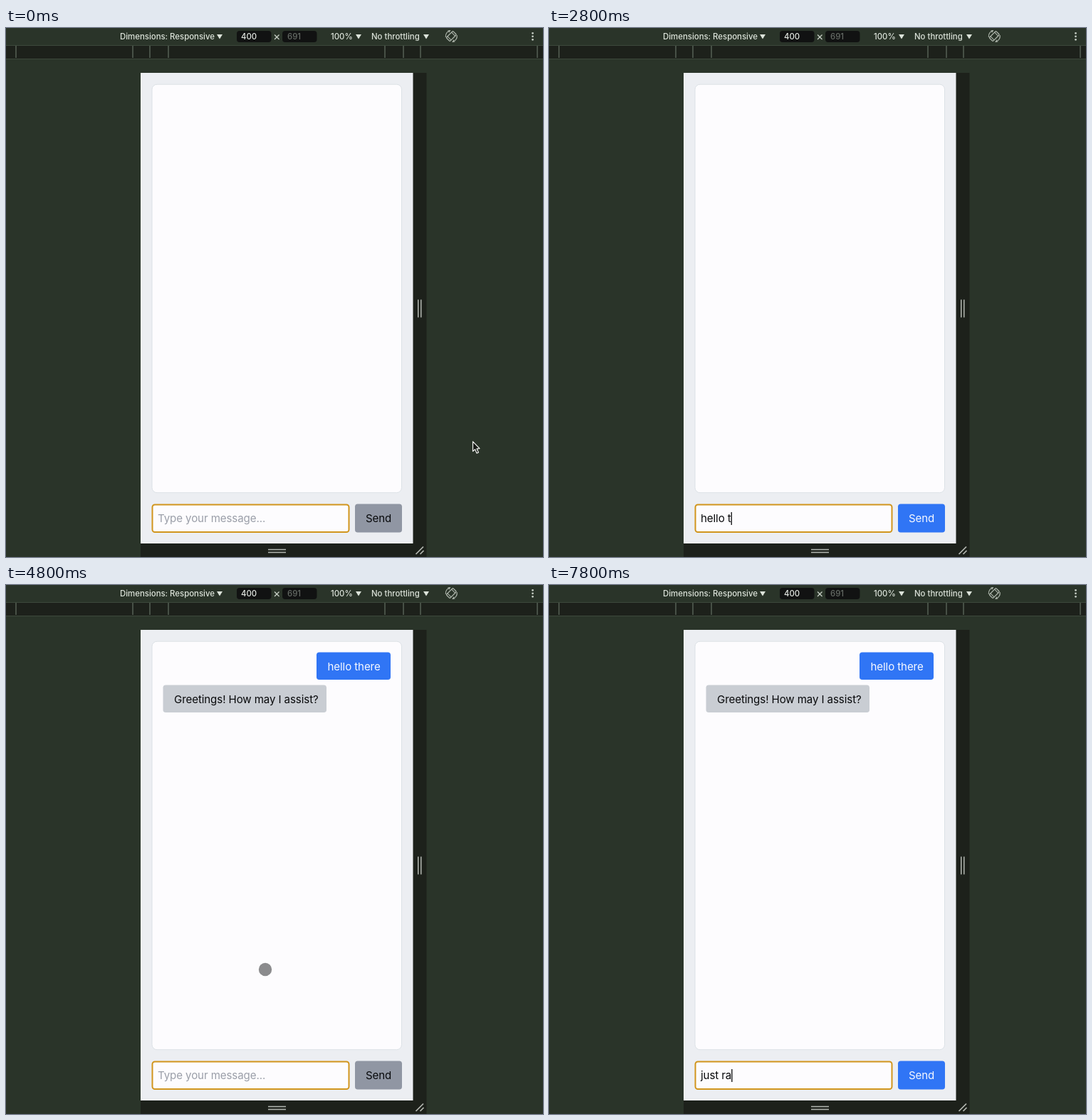
These frames come from a looping animation (754x743 px, 8000 ms). An HTML page with a canvas:

```html
<!DOCTYPE html>
<html lang="en">
<head>
<meta charset="utf-8">
<title>Chat preview</title>
<style>
html, body { margin: 0; width: 100%; height: 100%; overflow: hidden; background: #2a3429; }
canvas { display: block; }
</style>
</head>
<body>
<canvas id="stage" width="754" height="743"></canvas>
<script>
const ctx = document.getElementById('stage').getContext('2d');
const LOOP = 8000;
const SENT = 3800, REPLIED = 4000;
const PHONE_RIGHT = 571;
const CHAT = '15.1px Inter, sans-serif';
const BAR = '500 11.4px Inter, sans-serif';

// [time, text in the input]
const typing = [
  [0, ''], [800, 'h'], [1000, 'he'], [1200, 'hel'], [1500, 'hell'],
  [1800, 'hello'], [2300, 'hello '], [2700, 'hello t'], [2900, 'hello th'],
  [3000, 'hello the'], [3050, 'hello ther'], [3100, 'hello there'],
  [SENT, ''], [5700, 'j'], [6000, 'ju'], [6200, 'jus'], [6400, 'just'],
  [6900, 'just '], [7500, 'just r'], [7700, 'just ra']
];
const caretSpans = [[100, 550], [800, 3600], [4100, 4600], [5100, 5600], [5700, 7400], [7500, 8000]];

function rect(x, y, w, h, color) {
  ctx.fillStyle = color;
  ctx.fillRect(x, y, w, h);
}

function box(x, y, w, h, r, fill, stroke, width = 1) {
  ctx.beginPath();
  ctx.roundRect(x, y, w, h, r);
  if (fill) { ctx.fillStyle = fill; ctx.fill(); }
  if (stroke) { ctx.strokeStyle = stroke; ctx.lineWidth = width; ctx.stroke(); }
}

function line(points, color, width) {
  ctx.beginPath();
  points.forEach(([x, y]) => ctx.lineTo(x, y));
  ctx.strokeStyle = color;
  ctx.lineWidth = width;
  ctx.stroke();
}

function text(str, x, y, color, font = CHAT, spacing = -0.1) {
  ctx.font = font;
  ctx.letterSpacing = spacing + 'px';
  ctx.fillStyle = color;
  ctx.fillText(str, x, y);
  return ctx.measureText(str).width;
}

function dropMark(x) {
  ctx.beginPath();
  ctx.moveTo(x, 9);
  ctx.lineTo(x + 8, 9);
  ctx.lineTo(x + 4, 15.5);
  ctx.fillStyle = '#dce3da';
  ctx.fill();
}

function rotateIcon() {
  ctx.save();
  ctx.translate(625.3, 11.5);
  ctx.lineCap = 'round';
  ctx.strokeStyle = '#aeb6ac';
  for (const turn of [0, Math.PI]) {
    ctx.save();
    ctx.rotate(turn);
    ctx.lineWidth = 1.2;
    ctx.beginPath();
    ctx.arc(0, 0, 8, -0.1, 1.3);
    ctx.stroke();
    line([[4.6, 7.5], [2, 7.9], [3.4, 5.6]], '#aeb6ac', 1.1);
    ctx.restore();
  }
  ctx.rotate(Math.PI / 4);
  box(-3.6, -6.6, 7.2, 13.2, 1.2, null, '#aeb6ac', 1.3);
  line([[-3.5, -4], [3.5, -4]], '#aeb6ac', 1);
  line([[-3.5, 4], [3.5, 4]], '#aeb6ac', 1);
  ctx.restore();
}

function toolbar() {
  text('Dimensions: Responsive', 160, 16, '#dce3da', BAR, 0);
  dropMark(296);
  box(324, 4, 48.5, 16, 4, '#111212');
  box(388, 4, 48.5, 16, 4, '#111212');
  text('400', 330, 16, '#e4e8e3', BAR, 0);
  text('691', 395, 16, '#656b65', BAR, 0);
  line([[377, 9.5], [383.5, 16]], '#c9d0c7', 1.3);
  line([[383.5, 9.5], [377, 16]], '#c9d0c7', 1.3);
  text('100%', 456, 16, '#dce3da', BAR, 0);
  dropMark(491);
  text('No throttling', 513, 16, '#dce3da', BAR, 0);
  dropMark(586);
  rotateIcon();
  ctx.fillStyle = '#c4cbc2';
  for (const y of [7.3, 11.8, 16.3]) {
    ctx.beginPath();
    ctx.arc(739.5, y, 1.4, 0, 7);
    ctx.fill();
  }
  rect(0, 24, 754, 20, '#3d493c');
  rect(0, 25, 754, 18, '#1d211b');
  for (const x of [14, 178, 202, 228, 532, 558, 582, 746]) rect(x - 0.75, 25, 1.5, 17, '#566055');
}

function device() {
  rect(189, 63, 401.5, 680, '#1d211b');
  rect(189, 63, 382.5, 661, '#eceef2');
  const grip = '#b4b8b2';
  rect(578, 381.5, 1.5, 25, grip);
  rect(582, 381.5, 1.5, 25, grip);
  rect(368, 731.8, 25, 1.5, grip);
  rect(368, 735.8, 25, 1.5, grip);
  line([[575.5, 739], [586, 728.5]], grip, 1.7);
  line([[581.5, 739], [586.5, 734]], grip, 1.7);
  box(205, 79.2, 350.5, 573.5, 7, '#fdfcfe', '#dce1e6');
}

function messages(t) {
  if (t >= SENT) {
    box(436, 94.5, 104, 38.5, 3.8, '#3075f5');
    text('hello there', 451.5, 119.5, '#f7f9ff');
  }
  if (t >= REPLIED) {
    box(220.5, 140.5, 229.5, 38.5, 3.8, '#c9cdd3');
    text('Greetings! How may I assist?', 236, 165.5, '#08090b');
  }
}

function inputRow(t) {
  const value = typing.filter(([at]) => at <= t).pop()[1];
  box(205.5, 669.5, 276, 38.5, 3.5, '#fdfcfe', '#d1951c', 2);
  if (!value) text('Type your message...', 213, 694.3, '#9a9ea8');
  const width = value ? text(value, 213, 694.3, '#08090b') : 0;
  if (caretSpans.some(([on, off]) => t >= on && t < off)) {
    rect(213 + width, 680, 1.3, 18, '#08090b');
  }
  box(490, 668.5, 66, 40, 3.8, value ? '#3075f5' : '#9096a3');
  text('Send', 505, 694.3, value ? '#f7f9ff' : '#08090b');
}

function arrow(x, y) {
  ctx.save();
  ctx.translate(x, y);
  ctx.beginPath();
  [[0.5, 0.8], [0.5, 14.6], [3.6, 11.8], [6, 17.2], [8.4, 16.1], [6.1, 10.9], [10, 10.6]]
    .forEach(([px, py]) => ctx.lineTo(px, py));
  ctx.closePath();
  ctx.fillStyle = '#171a16';
  ctx.fill();
  ctx.strokeStyle = '#f1f3f0';
  ctx.lineWidth = 1.2;
  ctx.lineJoin = 'round';
  ctx.stroke();
  ctx.restore();
}

function pointer(t) {
  if (t < 800) return arrow(655, 580);
  if (t < 4400 || t >= 5700) return;
  const p = Math.min(1, (t - 4350) / 450);
  const e = 1 - (1 - p) ** 2;
  const x = 655 - 291 * e, y = 580 - 40 * e;
  if (x > PHONE_RIGHT) return arrow(x, y);
  ctx.beginPath();
  ctx.arc(x, y, 9.2, 0, 7);
  ctx.fillStyle = '#8b8b8d';
  ctx.fill();
}

function draw(t) {
  ctx.lineCap = 'butt';
  rect(0, 0, 754, 743, '#2a3429');
  toolbar();
  device();
  messages(t);
  inputRow(t);
  pointer(t);
}

const start = performance.now();
function tick() {
  draw((performance.now() - start) % LOOP);
  requestAnimationFrame(tick);
}
tick();
</script>
</body>
</html>
```
